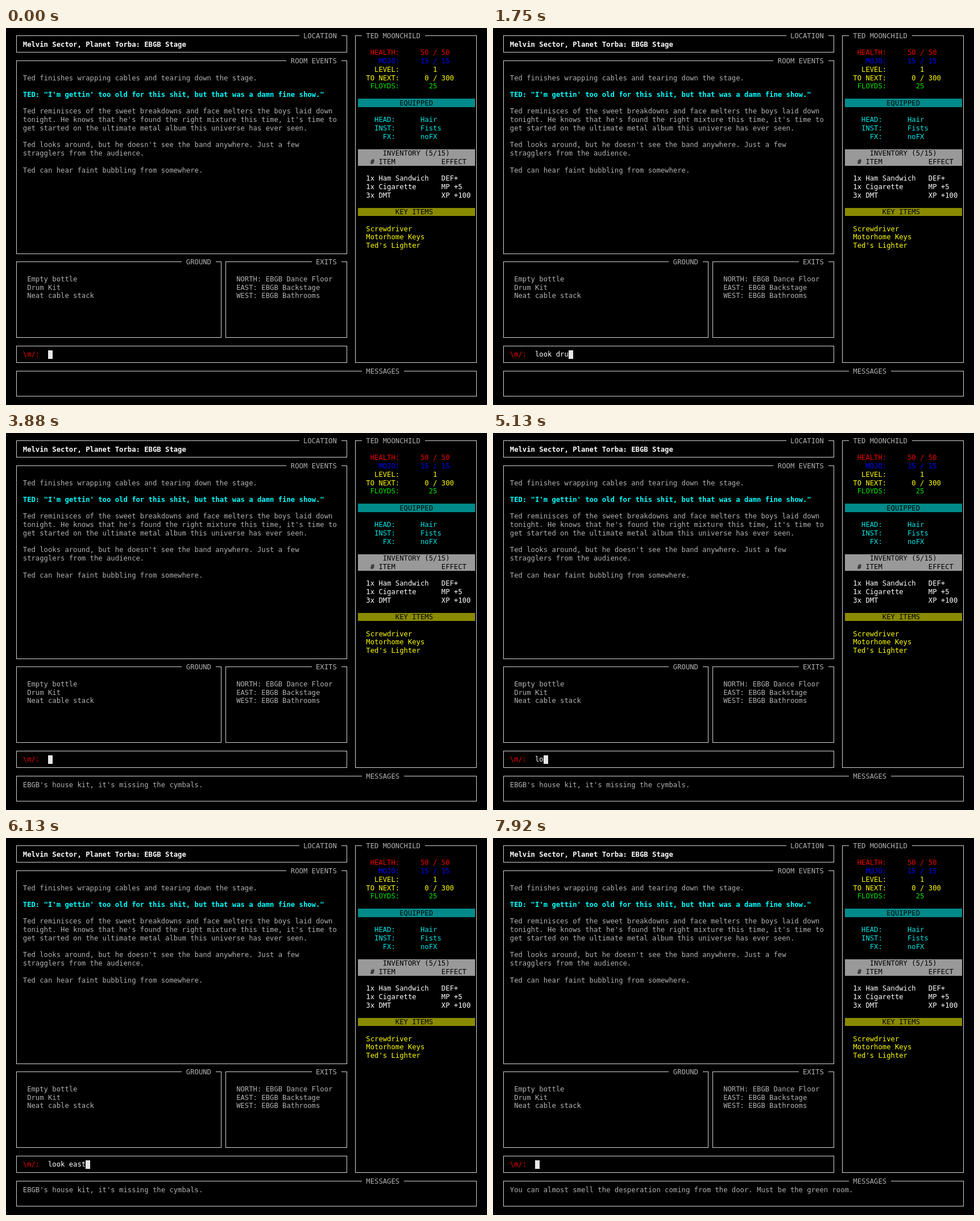
Recreate the animation shown at these times as an HTML page with a canvas. Size 846 by 662 pixels, loop 8000 ms.

```html
<!DOCTYPE html>
<html lang="en">
<head>
<meta charset="utf-8">
<title>Text adventure</title>
<style>
  html, body { margin: 0; width: 100%; height: 100%; overflow: hidden; background: #000; }
  canvas { display: block; }
</style>
</head>
<body>
<canvas id="screen" width="846" height="662"></canvas>
<script>
const ctx = document.getElementById('screen').getContext('2d');

// Terminal grid: cell size and the centre of the first cell
const CELL_W = 7.36, CELL_H = 14.72, ORIGIN_X = 18.73, ORIGIN_Y = 14;
// Box lines sit half a font pixel up and left of the cell centre
const LINE_SHIFT = 0.46;
const LOOP = 8000;

const GRAY = '#b2b2b2', WHITE = '#fff', LINE = '#d4d4d4', RED = '#f00000',
  BLUE = '#0000ff', YELLOW = '#ffff00', GREEN = '#00e600', CYAN = '#00e6e6', AQUA = '#00ffff';

const centerX = col => ORIGIN_X + col * CELL_W;
const centerY = row => ORIGIN_Y + row * CELL_H;
const lineX = col => Math.floor(centerX(col) - LINE_SHIFT) + 0.5;
const lineY = row => Math.floor(centerY(row) - LINE_SHIFT) + 0.5;

function print(text, col, row, color = GRAY, bold = false) {
  ctx.font = `${bold ? 'bold ' : ''}12.2px "DejaVu Sans Mono", monospace`;
  ctx.textAlign = 'center';
  ctx.fillStyle = color;
  [...text].forEach((ch, i) => {
    if (ch !== ' ') ctx.fillText(ch, centerX(col + i), centerY(row) + 4);
  });
}

function printLines(lines, col, row, color) {
  lines.forEach((line, i) => print(line, col, row + i, color));
}

function fillCells(col, row, cols, rows, color) {
  ctx.fillStyle = color;
  const x = Math.round(centerX(col - 0.5)), y = Math.round(centerY(row - 0.5));
  ctx.fillRect(x, y, Math.ceil(centerX(col + cols - 0.5)) - x,
    Math.round(centerY(row + rows - 0.5)) - y);
}

function box(left, top, right, bottom, title, titleCol) {
  const x = lineX(left), y = lineY(top);
  ctx.strokeStyle = LINE;
  ctx.lineWidth = 1;
  ctx.strokeRect(x, y, lineX(right) - x, lineY(bottom) - y);
  if (title) {
    fillCells(titleCol - 1, top, title.length + 2, 1, '#000');
    print(title, titleCol, top);
  }
}

function drawRoom() {
  box(0, 0, 79, 2, 'LOCATION', 69);
  print('Melvin Sector, Planet Torba: EBGB Stage', 2, 1, WHITE, true);

  box(0, 3, 79, 26, 'ROOM EVENTS', 66);
  print('Ted finishes wrapping cables and tearing down the stage.', 2, 5);
  print('TED: "I\'m gettin\' too old for this shit, but that was a damn fine show."', 2, 7, AQUA, true);
  printLines([
    'Ted reminisces of the sweet breakdowns and face melters the boys laid down',
    "tonight. He knows that he's found the right mixture this time, it's time to",
    'get started on the ultimate metal album this universe has ever seen.',
    '',
    "Ted looks around, but he doesn't see the band anywhere. Just a few",
    'stragglers from the audience.',
    '',
    'Ted can hear faint bubbling from somewhere.'
  ], 2, 9);

  box(0, 27, 49, 36, 'GROUND', 41);
  printLines(['Empty bottle', 'Drum Kit', 'Neat cable stack'], 3, 29);
  box(50, 27, 79, 36, 'EXITS', 72);
  printLines(['NORTH: EBGB Dance Floor', 'EAST: EBGB Backstage', 'WEST: EBGB Bathrooms'], 53, 29);
}

function drawCharacter() {
  box(81, 0, 110, 39, 'TED MOONCHILD', 84);
  const stat = (label, value, valueCol, row, color) => {
    print(label, 92 - label.length, row, color);
    print(value, valueCol, row, color);
  };
  stat('HEALTH:', '50 / 50', 97, 2, RED);
  stat('MOJO:', '15 / 15', 97, 3, BLUE);
  stat('LEVEL:', '1', 100, 4, YELLOW);
  stat('TO NEXT:', '0 / 300', 98, 5, YELLOW);
  stat('FLOYDS:', '25', 99, 6, GREEN);

  fillCells(82, 8, 28, 1, '#008a8a');
  print('EQUIPPED', 92, 8, '#000');
  const gear = (label, value, row) => {
    print(label, 91 - label.length, row, CYAN);
    print(value, 97, row, CYAN);
  };
  gear('HEAD:', 'Hair', 10);
  gear('INST:', 'Fists', 11);
  gear('FX:', 'noFX', 12);

  fillCells(82, 14, 28, 2, '#999');
  print('INVENTORY (5/15)', 88, 14, '#000');
  print('# ITEM', 85, 15, '#000');
  print('EFFECT', 102, 15, '#000');
  printLines(['1x Ham Sandwich', '1x Cigarette', '3x DMT'], 84, 17, WHITE);
  printLines(['DEF+', 'MP +5', 'XP +100'], 102, 17, WHITE);

  fillCells(82, 21, 28, 1, '#8a8a00');
  print('KEY ITEMS', 91, 21, '#000');
  printLines(['Screwdriver', 'Motorhome Keys', "Ted's Lighter"], 84, 23, YELLOW);
}

// Each command: key press times, the moment of Enter, and the reply
const commands = [
  { text: 'look drums', keys: [290, 500, 670, 790, 920, 1500, 1670, 1750, 1920, 2040],
    enter: 2330, reply: "EBGB's house kit, it's missing the cymbals." },
  { text: 'look east', keys: [4960, 5130, 5250, 5330, 5380, 5630, 5710, 5880, 6040],
    enter: 6380, reply: 'You can almost smell the desperation coming from the door. Must be the green room.' }
];

const cursorOff = [[1080, 1420], [2670, 2960], [3580, 3880], [4460, 4790],
  [5460, 5790], [6420, 6750], [7330, 7580]];

function stateAt(t) {
  let input = '', message = '';
  for (const { text, keys, enter, reply } of commands) {
    if (t >= enter) message = reply;
    else input += text.slice(0, keys.filter(k => k <= t).length);
  }
  return { input, message, cursor: !cursorOff.some(([from, to]) => t >= from && t < to) };
}

function draw({ input, message, cursor }) {
  ctx.fillStyle = '#000';
  ctx.fillRect(0, 0, 846, 662);
  drawRoom();
  drawCharacter();

  box(0, 37, 79, 39);
  print('\\m/:', 2, 38, RED);
  print(input, 8, 38, WHITE);
  if (cursor) fillCells(8 + input.length, 38, 1, 1, '#e8e8e8');

  box(0, 40, 110, 43, 'MESSAGES', 84);
  print(message, 2, 41);
}

let shown = '';
const start = performance.now();
function frame() {
  const state = stateAt((performance.now() - start) % LOOP);
  const key = JSON.stringify(state);
  if (key !== shown) {
    draw(state);
    shown = key;
  }
  requestAnimationFrame(frame);
}
frame();
</script>
</body>
</html>
```
